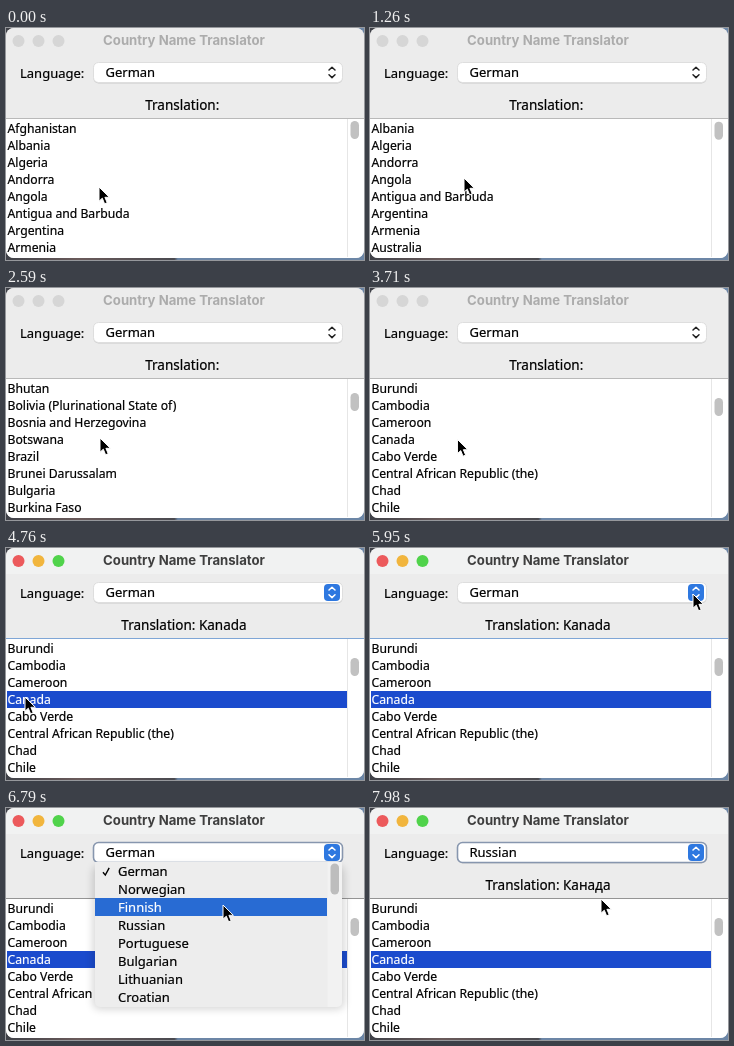
These frames come from a looping animation (358x232 px, 8000 ms). An HTML page:

```html
<!DOCTYPE html>
<html lang="en">
<head>
<meta charset="utf-8">
<title>Country Name Translator</title>
<style>
  html, body { margin: 0; width: 100%; height: 100%; overflow: hidden; }
  svg { display: block; width: 358px; height: 232px; }
  text { font: 13px "Noto Sans", "Open Sans", sans-serif; white-space: pre; stroke-width: .2; }
  #title { font: 700 13.15px Inter, Roboto, sans-serif; }
  #label { font-size: 13.5px; }
  #rows text { font-size: 12.2px; }
</style>
</head>
<body>
<svg viewBox="0 0 358 232">
  <defs>
    <linearGradient id="desk">
      <stop offset="0" stop-color="#3f4148"/>
      <stop offset=".2" stop-color="#6a5a5a"/>
      <stop offset=".47" stop-color="#4a4a50"/>
      <stop offset=".48" stop-color="#6c86a6"/>
      <stop offset="1" stop-color="#6c86a6"/>
    </linearGradient>
    <filter id="soft" x="-10%" y="-10%" width="120%" height="125%"><feGaussianBlur stdDeviation="4"/></filter>
    <clipPath id="windowClip"><rect width="358" height="230" rx="8"/></clipPath>
    <clipPath id="menuClip"><path d="M89 54H336V194a5 5 0 0 1-5 5H94a5 5 0 0 1-5-5Z"/></clipPath>
  </defs>

  <rect width="358" height="232" fill="url(#desk)"/>
  <g clip-path="url(#windowClip)">
    <rect width="358" height="230" fill="#ececec"/>
    <rect id="bar" width="358" height="26"/>
    <g id="lights"></g>
    <text id="title" x="178" y="17" text-anchor="middle"></text>

    <text x="14" y="49.5" stroke="#000">Language:</text>
    <rect x="87.5" y="35" width="249" height="20.5" rx="5" opacity=".14"/>
    <rect id="combo" x="87.5" y="34.5" width="249" height="20" rx="5" fill="#fff"/>
    <text id="lang" x="99.5" y="49" stroke="#000"></text>
    <rect id="button" x="318" y="36" width="16" height="17" rx="4" fill="#2e78e0"/>
    <path id="arrows" d="M323 42 326 39.2l3 2.8M323 46.8 326 49.6l3-2.8" fill="none" stroke-width="1.5" stroke-linecap="round" stroke-linejoin="round"/>
    <text id="label" x="178" y="82" text-anchor="middle" stroke="#000"></text>

    <rect y="91" width="358" height="139" fill="#fff"/>
    <path id="edge" d="M0 90.5H358"/>
    <rect id="mark" x="1" width="340" height="17" fill="#1b4bcd"/>
    <g id="rows"></g>
    <path d="M341.5 91V229" stroke="#e6e6e6"/>
    <rect id="thumb" x="344.5" width="8.5" height="18" rx="4.2" fill="#c1c1c1"/>
  </g>

  <g id="menu">
    <rect x="87" y="58" width="251" height="143" rx="6" opacity=".17" filter="url(#soft)"/>
    <g clip-path="url(#menuClip)">
      <rect x="89" y="54" width="247" height="145" fill="#ededed"/>
      <rect x="321.5" y="54" width="15" height="145" fill="#f2f2f2"/>
      <rect x="324.5" y="55.5" width="8.5" height="31" rx="4.2" fill="#bdbdbd"/>
      <rect id="hover" x="89" width="232" height="18" fill="#286bd3"/>
      <path id="check" d="M97 64.2 99.3 67.1 103.2 59.9" fill="none" stroke-width="1.4"/>
      <g id="items"></g>
    </g>
  </g>

  <path id="cursor" d="M0 0V14.2L3.3 11.2 5.6 16.8 8.2 15.7 5.9 10.3H10.4Z" stroke="#fff" stroke-linejoin="round"/>
</svg>
<script>
const LOOP = 8000, STEP = 70, ROW = 17, ITEM = 18;
const ACTIVE = 4550, SELECT = 4620, TRANSLATE = 4690, OPEN = 6160, CHOOSE = 7700, CLOSED = 7840;
const countries = ("Afghanistan,Albania,Algeria,Andorra,Angola,Antigua and Barbuda,Argentina,Armenia," +
  "Australia,Austria,Azerbaijan,Bahamas (the),Bahrain,Bangladesh,Barbados,Belarus,Belgium,Belize,Benin," +
  "Bhutan,Bolivia (Plurinational State of),Bosnia and Herzegovina,Botswana,Brazil,Brunei Darussalam," +
  "Bulgaria,Burkina Faso,Burundi,Cambodia,Cameroon,Canada,Cabo Verde," +
  "Central African Republic (the),Chad,Chile").split(",");
const languages = "German,Norwegian,Finnish,Russian,Portuguese,Bulgarian,Lithuanian,Croatian".split(",");
const CANADA = countries.indexOf("Canada");

// each move: start, end, target
const strokes = [
  [840, 980, [94, 150]], [3640, 3990, [48, 160]], [3990, 4270, [19, 149]], [4970, 5810, [323, 46]],
  [6370, 6790, [217, 97]], [6790, 7280, [163, 122]], [7630, 7980, [231, 91]]
];
const flicks = [[1190, 1890, [13]], [2030, 2100, [15]], [2380, 2870, [25]], [2940, 3150, [27]]];

const clamp = v => Math.min(1, Math.max(0, v));
const ease = f => .4 * f + .6 * f * f * (3 - 2 * f);
const follow = (moves, from, t) => moves.reduce((pos, [start, end, to]) => {
  const f = ease(clamp((t - start) / (end - start)));
  return pos.map((v, i) => v + (to[i] - v) * f);
}, from);

const $ = id => document.getElementById(id);
function set(el, attrs) {
  for (const k in attrs) el.setAttribute(k, attrs[k]);
  return el;
}
function add(parent, tag, attrs) {
  return set($(parent).appendChild(document.createElementNS("http://www.w3.org/2000/svg", tag)), attrs);
}
const ink = (el, color) => set(el, { fill: color, stroke: color });
const show = (id, on) => set($(id), { opacity: +on });

$("title").textContent = document.title;
const lightColors = ["#ec5a5c", "#f1b53d", "#50d34b"];
const lights = lightColors.map((_, i) => add("lights", "circle", { cx: 12.5 + 20 * i, cy: 13, r: 6 }));
const rows = Array.from({ length: 8 }, (_, i) => add("rows", "text", { x: 1.5, y: 105 + ROW * i }));
const items = languages.map((name, i) => {
  const el = add("items", "text", { x: 112, y: 68 + ITEM * i });
  el.textContent = name;
  return el;
});

function draw(time) {
  const t = Math.floor(time / STEP) * STEP;
  const active = t >= ACTIVE, selected = t >= SELECT, opened = t >= OPEN, chosen = t >= CHOOSE;
  const [x, y] = follow(strokes, [93, 159], t);
  const top = Math.round(follow(flicks, [0], t)[0]);

  lights.forEach((el, i) => set(el, { fill: active ? lightColors[i] : "#d6d6d6" }));
  set($("bar"), { fill: active ? "#f1f2f2" : "#ececec" });
  set($("title"), { fill: active ? "#3f3f3f" : "#acacac" });
  show("button", active);
  set($("arrows"), { stroke: active ? "#fff" : "#222" });
  set($("combo"), { stroke: opened ? "#8796ae" : "#dedede", "stroke-width": opened ? 1.6 : 1 });
  set($("edge"), { stroke: opened ? "#949494" : selected ? "#7fa6d6" : "#b9b9b9" });

  $("lang").textContent = chosen ? "Russian" : "German";
  $("label").textContent = "Translation: " + (chosen ? "Канада" : t >= TRANSLATE ? "Kanada" : "");

  rows.forEach((el, i) => {
    el.textContent = countries[top + i];
    ink(el, selected && top + i === CANADA ? "#fff" : "#000");
  });
  set($("mark"), { y: 92 + ROW * (CANADA - top) });
  show("mark", selected);
  set($("thumb"), { y: 93 + top * .63 });

  const fade = 1 - clamp((t - CHOOSE + STEP) / (CLOSED - CHOOSE + STEP));
  const hover = chosen ? 3 : Math.max(0, Math.floor((y - 54) / ITEM));
  show("menu", opened ? fade : 0);
  set($("hover"), { y: 54 + ITEM * hover });
  set($("check"), { stroke: hover ? "#000" : "#fff" });
  items.forEach((el, i) => ink(el, i === hover ? "#fff" : "#000"));

  set($("cursor"), { transform: `translate(${x} ${y})` });
}

function tick() {
  draw(performance.now() % LOOP);
  requestAnimationFrame(tick);
}
tick();
</script>
</body>
</html>
```
